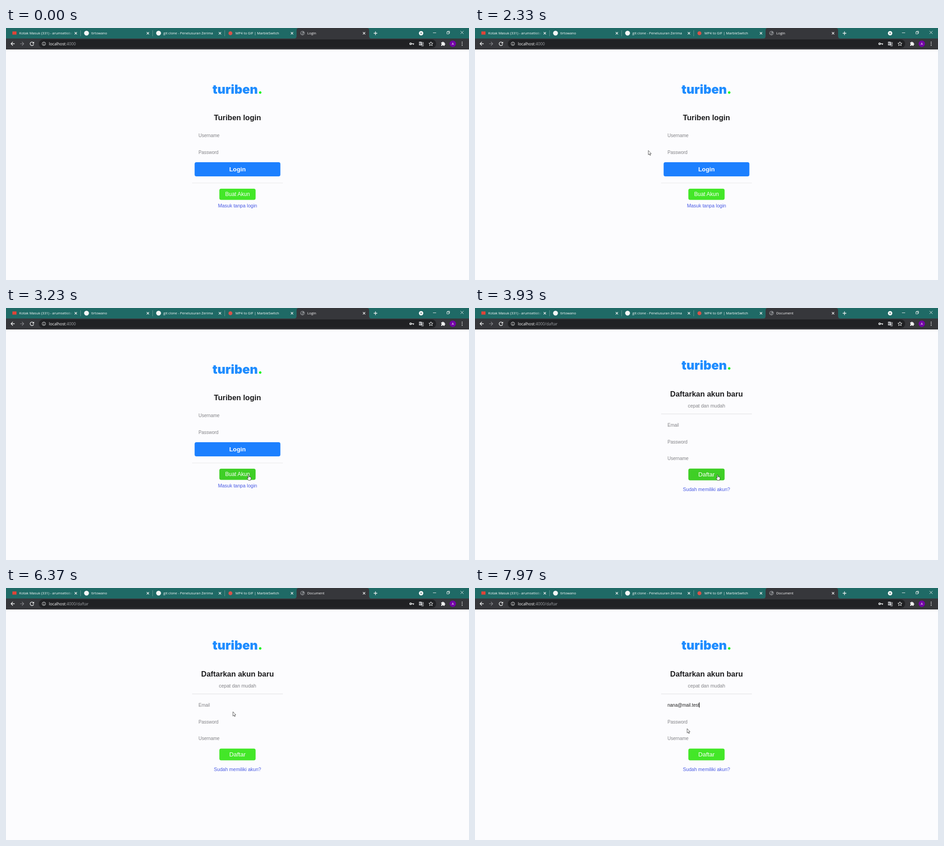
Animation, 1015 px wide and 552 px high, one loop 8 s. Source, as an HTML page:

```html
<!DOCTYPE html>
<html lang="id">
<head>
<meta charset="utf-8">
<title>Login</title>
<style>
  html, body { margin: 0; height: 100%; overflow: hidden; background: #fcfcfe; }
  svg { display: block; width: 100vw; height: 100vh; }
  .ui { font: 7.7px "Open Sans", sans-serif; fill: #fff; }
  .url { font-size: 8.75px; }
  .page { font: 10px "Liberation Sans", Arial, sans-serif; }
  .mid { text-anchor: middle; }
  .logo { font: 900 27px Inter, sans-serif; fill: #1e8cff; }
  .head { font-weight: bold; font-size: 16.5px; fill: #1c1c1e; }
  .hint { fill: #828286; }
  .link { font-size: 10.57px; fill: #4759e4; }
  .btn { fill: #fff; font-size: 13.2px; }
  .line { fill: none; stroke: #f0f2f2; stroke-width: 1.1; }
</style>
</head>
<body>
<svg viewBox="0 0 1015 552">
  <defs>
    <linearGradient id="fade">
      <stop stop-color="#1f6a66" stop-opacity="0"/><stop offset="1" stop-color="#1f6a66"/>
    </linearGradient>
    <clipPath id="tabClip"><path d="M29 0H146V23H29Z"/></clipPath>
    <path id="x" class="line" d="M-2.5-2.5l5 5m0-5l-5 5"/>
  </defs>

  <path fill="#fcfcfe" d="M0 0H1015V552H0Z"/>

  <!-- tab strip -->
  <path fill="#1f6a66" d="M0 0H1015V24H0Z"/>
  <path fill="#36373b" d="M0 23H632Q637 23 637 18V5Q637 0 642 0H791Q796 0 796 5V18Q796 23 801 23H1015V47H0Z"/>
  <path stroke="#639792" d="M163.5 5v13m158-13v13m158-13v13"/>
  <path fill="#e04438" d="M14 7.5h9v7h-9z"/>
  <circle cx="176.5" cy="11.3" r="5.3" fill="#f4f6f6"/>
  <circle cx="334.5" cy="11.3" r="5.3" fill="#f4f6f6"/>
  <circle cx="492" cy="11.5" r="4.3" fill="#d8534b"/>
  <circle cx="650" cy="11.2" r="4.8" fill="#8b8d91"/>
  <path fill="#46484c" d="M646 9.5l3-2 2 1-1.5 2.5 1.5 1-1.5 2.5-2-1zm6 1.5l2 .5-1.5 3-1.5-1z"/>
  <g class="ui">
    <text x="29" y="13.8" clip-path="url(#tabClip)">Kotak Masuk (331) - arumsetiobagas</text>
    <path fill="url(#fade)" d="M134 3h12v16h-12z"/>
    <text x="187" y="13.8">tirtowano</text>
    <text x="345" y="13.8">git clone - Penelusuran Zerima</text>
    <text x="503" y="13.8">MP4 to GIF | MarbleSwitch</text>
    <text x="660.5" y="13.8" id="tab"></text>
  </g>
  <use href="#x" x="153" y="11.5"/><use href="#x" x="311" y="11.5"/>
  <use href="#x" x="469" y="11.5"/><use href="#x" x="627" y="11.5"/>
  <use href="#x" x="785" y="11.5"/>
  <path class="line" style="stroke-width:1.4" d="M806 11.5h8m-4-4v8"/>
  <circle cx="910" cy="11.5" r="4.8" fill="#fff"/>
  <path fill="#1f5552" d="M907.7 10.5h4.6l-2.3 2.6z"/>
  <path class="line" style="stroke-width:.9" d="M936 10.5h7M966.5 8.5h4.5v4.5h-4.5zM968 8.5v-1.5h4.5v4.5h-1.5M996.5 6.5l6.5 6.5m0-6.5l-6.5 6.5"/>

  <!-- toolbar -->
  <rect x="72" y="25" width="871" height="19" rx="9.5" fill="#202124"/>
  <text class="ui url" x="94" y="37.7" id="url"></text>
  <path class="line" style="stroke-width:1.3" d="M19 34.5h-8m4-4l-4 4 4 4"/>
  <path class="line" style="stroke-width:1.2;stroke:#85878b" d="M31 34.5h8m-4-4l4 4-4 4"/>
  <path class="line" style="stroke-width:1.3" d="M60 32a4 4 0 1 0 .8 3.5"/>
  <path fill="#f0f2f2" d="M61.5 30v4h-4z"/>
  <circle class="line" cx="83" cy="34.5" r="3.8" style="stroke-width:.9"/>
  <path class="line" style="stroke-width:1" d="M83 32v1m0 1v3"/>
  <circle class="line" cx="887" cy="34.5" r="1.8" style="stroke-width:1.5"/>
  <path class="line" style="stroke-width:1.5" d="M889 34.5h5.5m-1.3 0v2.2"/>
  <path fill="#c9cbce" d="M905.5 30h5.5l2.5 8h-8z"/>
  <path class="line" style="stroke-width:.9;stroke:#c9cbce" d="M911.5 31.5h3.5v8h-4.5M912 34h3"/>
  <path stroke="#33353a" stroke-width=".9" fill="none" d="M909.5 33a1.7 1.7 0 1 0 .3 1.3h-1.5"/>
  <path class="line" style="stroke-width:1" d="M931.5 30l1.3 3.1 3.3.2-2.5 2.1.8 3.3-2.9-1.8-2.9 1.8.8-3.3-2.5-2.1 3.3-.2z"/>
  <path fill="#f0f2f2" d="M954 31.5h2.3a1.5 1.5 0 0 1 3 0h2.2v2.3a1.5 1.5 0 0 1 0 3v2.2h-2.5a1.3 1.3 0 0 0-2.6 0h-2.4v-2.5a1.3 1.3 0 0 0 0-2.6z"/>
  <circle cx="979.5" cy="34.5" r="7" fill="#7402a8"/>
  <text class="ui mid" style="font-size:7px" x="979.5" y="37">A</text>
  <g fill="#f0f2f2"><circle cx="1000" cy="31" r=".95"/><circle cx="1000" cy="34.5" r=".95"/><circle cx="1000" cy="38" r=".95"/></g>

  <g class="page" id="login">
    <text class="mid logo" x="507.5" y="143.7">turiben<tspan fill="#12f51c">.</tspan></text>
    <text class="mid head" x="507.5" y="202">Turiben login</text>
    <text class="hint" x="422" y="239.2">Username</text>
    <text class="hint" x="422" y="275.6">Password</text>
    <rect x="413.5" y="294" width="188" height="31" rx="4" fill="#1c80ff"/>
    <text class="mid btn" font-weight="bold" x="507.5" y="314.2">Login</text>
    <path stroke="#e8e8e9" d="M408 339.5H607"/>
    <rect id="create" x="467.7" y="352" width="79.5" height="24.5" rx="4"/>
    <text class="mid btn" style="font-size:11.9px" x="507.5" y="368.2">Buat Akun</text>
    <text class="mid link" x="507.5" y="393">Masuk tanpa login</text>
  </g>

  <g class="page" id="signup">
    <text class="mid logo" x="507.5" y="135.2">turiben<tspan fill="#12f51c">.</tspan></text>
    <text class="mid head" x="507.5" y="193.5">Daftarkan akun baru</text>
    <text class="mid hint" style="font-size:10.57px" x="507.5" y="218.2">cepat dan mudah</text>
    <path stroke="#dddde0" d="M408 232H607"/>
    <text x="422" y="259.8" id="email"></text>
    <path id="caret" fill="#111" d="M0 250.5h1.1v11.5h-1.1z"/>
    <text class="hint" x="422" y="296.8">Password</text>
    <text class="hint" x="422" y="333.2">Username</text>
    <rect id="submit" x="467.7" y="351.7" width="79.5" height="25.8" rx="4"/>
    <text class="mid btn" x="507.5" y="369.2">Daftar</text>
    <text class="mid link" x="507.5" y="401">Sudah memiliki akun?</text>
  </g>

  <g id="pointer">
    <path id="arrow" fill="#fff" stroke="#333" stroke-width=".8" d="M0 0V9.5L2.2 7.5 3.7 10.8 5 10.2 3.6 7H6.5Z"/>
    <path id="hand" fill="#fff" stroke="#222" stroke-width=".8" d="M-1 .9a.9.9 0 0 1 1.8 0V4.3l3.2.6q1.6.4 1.5 2.1l-.3 2-.9 3H-.3L-3 8.3q-.5-1.5.9-1.3l1.1.8Z"/>
    <path id="beam" fill="none" stroke="#333" stroke-width=".9" d="M-2-4.3h1.5L0-3.8.5-4.3H2M0-3.8V3.8M-2 4.3h1.5L0 3.8l.5.5H2"/>
  </g>
</svg>
<script>
const LOOP = 8000, SWAP = 3800, CLICK = 4770, PICK = 7440;
const longMail = "arumsetiobagaskaradiwijaya@mail.test", shortMail = "nana@mail.test";
const $ = id => document.getElementById(id);
const show = (id, on) => $(id).style.display = on ? "" : "none";

// Pointer waypoints: time, x, y
const path = [
  [860, 503, 289.3], [1360, 503, 289.3], [1500, 540, 279], [1660, 645, 290], [1870, 703, 335],
  [2329, 703, 335], [2330, 380, 268.3], [2480, 248, 280], [3130, 531, 364], [3200, 531, 364],
  [3230, 531.8, 365.3], [4070, 531.8, 365.3], [4570, 497.5, 263.8], [5540, 497.5, 263.8],
  [5640, 497.5, 271], [6370, 497.5, 271], [6700, 497.5, 342.3], [6940, 497.5, 357],
  [7640, 497.5, 359], [7830, 440, 261], [7970, 465, 308], [8000, 465, 308]
];

function pointerAt(t) {
  const i = Math.max(1, path.findIndex(p => p[0] > t));
  const [t0, x0, y0] = path[i - 1], [t1, x1, y1] = path[i];
  const u = Math.min(1, Math.max(0, (t - t0) / (t1 - t0))), k = u * u * (3 - 2 * u);
  return [x0 + (x1 - x0) * k, y0 + (y1 - y0) * k];
}

function mailAt(t) {
  if (t >= PICK) return [shortMail, 10, "#222"];
  if (t >= 6850) return [shortMail, 8.8, "#222"];
  if (t >= 6450) return [longMail, 8.8, "#222"];
  return ["Email", 10, "#828286"];
}

function draw(t) {
  const signup = t >= SWAP, [x, y] = pointerAt(t);
  show("login", !signup);
  show("signup", signup);
  $("tab").textContent = signup ? "Document" : "Login";
  $("url").innerHTML = 'localhost<tspan fill="#a0a3a7">:4000' + (signup ? "/daftar" : "") + "</tspan>";

  const [text, size, color] = mailAt(t), email = $("email");
  email.textContent = text;
  email.style.fontSize = size + "px";
  email.style.fill = color;
  const since = t - CLICK;
  show("caret", since >= 0 && (t >= PICK || Math.floor(since / 533) % 2 == 0));
  const end = t >= PICK ? email.getComputedTextLength() - 0.3 : 0;
  $("caret").setAttribute("transform", `translate(${421.8 + end})`);

  // The suggestion list lies over the fields while it is open
  const listOpen = t >= 5600 && t < 7640;
  const hover = t >= 860 && !listOpen && x > 468 && x < 547 && y > 352 && y < 377;
  const fields = signup ? [256, 293, 329] : [236, 272];
  const typing = !listOpen && x > 413 && x < 602 && fields.some(c => Math.abs(y - c) < 14);
  for (const id of ["create", "submit"]) $(id).style.fill = hover ? "#3fcf26" : "#43e728";
  show("pointer", t >= 860);
  $("pointer").setAttribute("transform", `translate(${x} ${y})`);
  show("hand", hover);
  show("beam", typing && !hover);
  show("arrow", !typing && !hover);
}

const start = performance.now();
function frame() {
  draw((performance.now() - start) % LOOP);
  requestAnimationFrame(frame);
}
frame();
</script>
</body>
</html>
```
